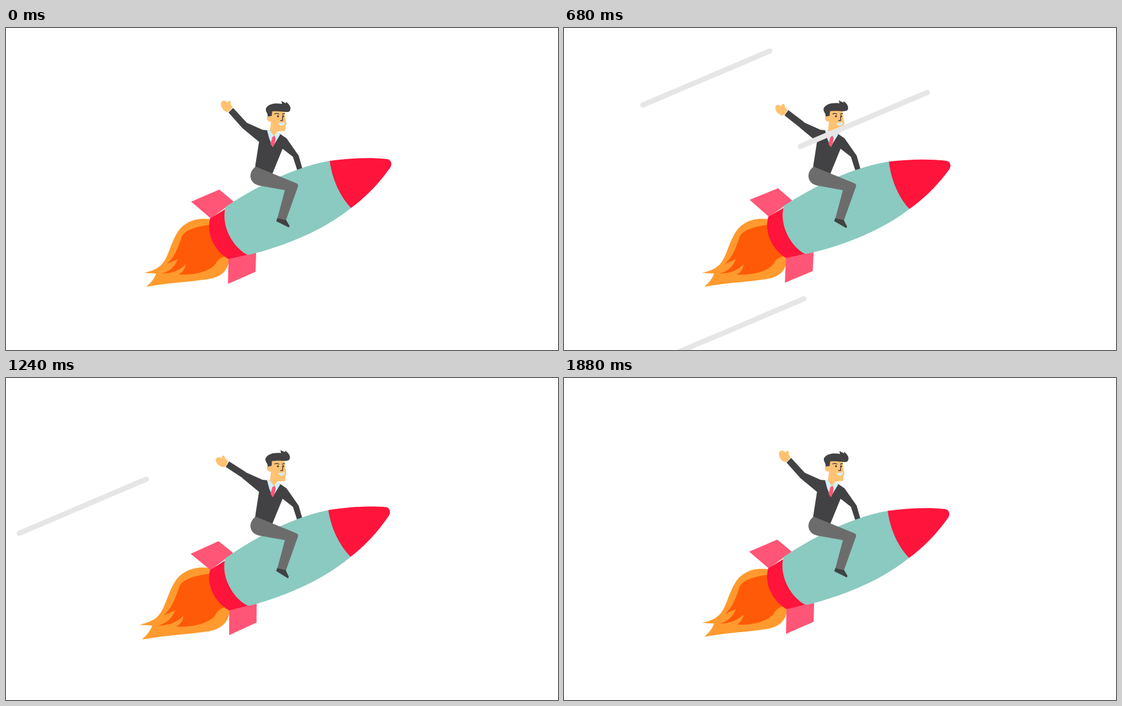
An HTML page that plays this animation: 960 px wide and 560 px high, repeating every 1920 ms.

```html
<!DOCTYPE html>
<html lang="en">
<head>
<meta charset="utf-8">
<title>Rocket ride</title>
<style>
  html, body { margin: 0; width: 100%; height: 100%; overflow: hidden; background: #fff; }
  svg { display: block; width: 960px; height: 560px; }
  .dark { fill: #424143; }
  .skin { fill: #ffc273; }
  .red { fill: #ff143c; }
  .pink { fill: #ff5576; }
  #streaks { stroke: #e6e6e6; stroke-width: 9; stroke-linecap: round; }
</style>
</head>
<body>
<svg viewBox="0 0 960 560">
  <g id="flame">
    <path fill="#ff9a2e" d="M357 333C335 329 312 335 299 354C285 376 283 399 270 412C262 420 251 423 240 426L261 427C258 436 252 443 244 450C283 443 315 442 350 437C372 434 386 424 388 402L370 350Z"/>
    <path fill="#ff5a08" d="M356 342C330 345 311 352 306 362C299 382 294 398 280 410L299 402C293 416 284 424 270 427C289 427 303 421 312 411C312 419 307 425 300 429C325 430 351 425 364 411C368 402 374 399 382 397L370 350Z"/>
  </g>

  <g id="torso">
    <g id="forearm">
      <path id="hand" class="skin" d="M383 146C376 142 373 136 374 130C376 125 382 125 385 130L387 127C391 125 391 129 391 133L394 138L388 145Z"/>
      <path class="dark" d="M387 147L395 139L418 164L420 176L411 174Z"/>
    </g>
    <path class="dark" d="M417 164L446 177L456 178L465 190L475 183L488 192L509 222L517 250L508 252L499 224L481 210L463 254L455 262L433 243L440 198L411 174Z"/>
    <path fill="#d3effb" d="M454 178L459 177L466 188L473 180L477 185L468 200L464 207L458 193Z"/>
    <path class="pink" d="M463 190L467 187L469 192L467 202L464 207L460 202Z"/>
    <path class="skin" d="M460 143L484 143L486 158L488 166C486 168 487 171 485 179L472 180L466 188L459 178L461 163C456 163 453 160 454 155C455 152 459 152 461 154Z"/>
    <path id="hair" class="dark" d="M455 154C456 148 451 146 452 140C456 132 467 130 480 132L479 127L487 131L487 128.500C494 133 497 140 493 145C488 148 480 144 463 145L462 153Z"/>
    <g fill="none" stroke="#424143" stroke-width="1.500">
      <path d="M467 150Q470 147 475 150M480 150L485 148.500M481 155V161H477"/>
    </g>
    <circle class="dark" cx="473" cy="153.500" r="1.700"/>
    <circle class="dark" cx="482" cy="153.500" r="1.700"/>
    <path fill="#d3effb" d="M473.500 165Q479 166 485 163.500Q485 169 480 170Q475 170 473.500 165Z"/>
  </g>

  <g id="rocket">
    <path class="pink" d="M322 302L371 281L396 302L356 331ZM387 401L435 391L434 424L386 445Z"/>
    <path class="red" d="M383 314L355 331C348 358 362 387 387 402L421 394L430 350Z"/>
    <path fill="#8acac0" d="M382 311C420 286 490 244 563 231L610 270L600 313C548 355 480 380 425 394Q421 395 417 393C394 380 373 343 382 311Z"/>
    <path class="red" d="M563 231C600 226 635 225 663 228C670 229 672 237 668 243C649 270 626 294 600 313C580 292 567 262 563 231Z"/>
  </g>

  <path id="shoe" class="dark" d="M472 330L486 332L493 344L492 347L470 336Z"/>
  <path fill="#6d6c6d" d="M434 241L505 270Q509 272 508 275L487 334L472 331L485 282L440 274C423 270 420 252 434 241Z"/>
  <g id="streaks"></g>
</svg>
<script>
  const FRAME = 40, LOOP = 48, CYCLE = 23;
  const part = id => document.getElementById(id);
  const turn = (id, deg, x, y) =>
    part(id).setAttribute('transform', `rotate(${deg} ${x} ${y})`);

  // Value at x along [position, value] keys, with an optional ease
  function along(keys, x, ease = u => u) {
    const i = Math.max(1, keys.findIndex(k => k[0] >= x));
    const [a, b] = [keys[i - 1], keys[i]];
    return a[1] + (b[1] - a[1]) * ease((x - a[0]) / (b[0] - a[0]));
  }
  const smooth = u => (1 - Math.cos(Math.PI * u)) / 2;

  const rock = [[0, 0], [7, -1.6], [10, 0], [16.5, 1.07], [23, 0]];
  const flicker = [[0, 1], [.064, 1], [.234, 1.06], [.617, .818],
                   [.851, .856], [.979, .9545], [1, 1]];

  // Each streak: reference step, its lower end then, and travel per step
  const streaks = [
    [17, 137, 134, -124, 40],
    [17, 411, 206, -337, 130],
    [17, 196, 565, -117, 49],
    [8, 23, 270, -130, 48],
    [5, 20, 540, -250, 100]
  ].map(([at, x, y, vx, vy]) => {
    const el = document.createElementNS('http://www.w3.org/2000/svg', 'path');
    el.setAttribute('d', 'M0 0L221 -94');
    part('streaks').append(el);
    return { el, at, x, y, vx, vy };
  });

  function draw(n) {
    const p = n < 2 * CYCLE ? n % CYCLE : 0;
    const wave = (1 - Math.cos(2 * Math.PI * p / CYCLE)) / 2;

    turn('rocket', along(rock, p, smooth), 500, 345);
    turn('forearm', -19 * wave, 414, 169);
    turn('hand', -6 * wave, 391, 143);
    turn('hair', -5 * wave, 457, 153);
    turn('shoe', 7 * wave, 475, 332);

    const size = along(flicker, 14 * n / 47 % 1);
    part('flame').setAttribute('transform',
      `translate(372 370) scale(${size}) translate(-372 -370)`);

    for (const s of streaks) {
      const d = p - s.at;
      s.el.setAttribute('transform', `translate(${s.x + s.vx * d} ${s.y + s.vy * d})`);
    }
  }

  const start = performance.now();
  function tick() {
    const t = Math.max(0, performance.now() - start);
    draw(Math.floor(t / FRAME) % LOOP);
    requestAnimationFrame(tick);
  }
  tick();
</script>
</body>
</html>
```
